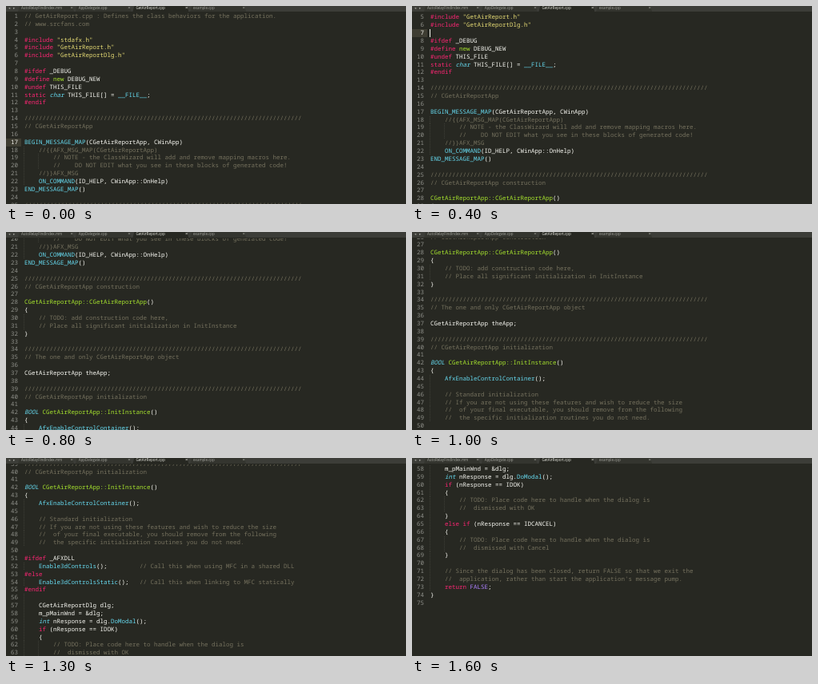
Recreate the animation shown at these times as an HTML page. Size 500x248 px, loop 2300 ms.

```html
<!DOCTYPE html>
<html lang="en">
<head>
<meta charset="utf-8">
<title>Scrolling code editor</title>
<style>
  html, body { margin: 0; width: 100%; height: 100%; overflow: hidden; background: #272822; }
  #stage { position: relative; width: 500px; height: 248px; overflow: hidden; background: #272822; }
  #bar { position: absolute; inset: 0 0 auto; height: 7px; overflow: hidden; background: #3c3d38;
    font: 4.5px/8px "Open Sans", sans-serif; color: #a3a49d; }
  #bar span { position: absolute; top: -2.5px; white-space: pre; }
  #bar .active { color: #e6e6de; }
  #bar .tab { top: 0; width: 70px; height: 7px; background: #34352f; clip-path: polygon(2px 0, 68px 0, 70px 100%, 0 100%); }
  #bar .tab.active { background: #272822; }
  #view { position: absolute; left: 0; top: 8px; width: 500px; height: 240px; overflow: hidden; }
  #code { position: absolute; left: 0; top: 0; width: 500px; color: #f8f8f2;
    font: 500 7.51px/9.86px "Noto Sans Mono", monospace; text-rendering: geometricPrecision; }
  .row { position: absolute; left: 0; width: 500px; height: 9.86px; white-space: pre; }
  .num { position: absolute; top: 1px; right: 485px; color: #8f908a; }
  .text { position: absolute; top: 1px; left: 22.9px; }
  .guide { position: absolute; top: 0; width: 1px; height: 9.86px;
    background: repeating-linear-gradient(#3d3e36 0 1px, transparent 1px 2px); }
  .mark { position: absolute; left: 0; width: 19px; height: 9.86px; background: #3e3d32; }
  #caret { position: absolute; left: 22px; width: 1px; height: 9.86px; background: #f8f8f0; }
  .comment { color: #75715e; }
  .string { color: #e6db74; }
  .word { color: #f92672; }
  .type { color: #66d9ef; font-style: italic; }
  .value { color: #ae81ff; }
  .name { color: #a6e22e; }
  .call { color: #66d9ef; }
</style>
</head>
<body>
<div id="stage">
  <div id="bar"></div>
  <div id="view"><div id="code"></div></div>
</div>
<script>
const LOOP = 2300, PITCH = 9.86, CHAR = 4.506;
const rule = '/'.repeat(77);

const lines = `// GetAirReport.cpp : Defines the class behaviors for the application.
// www.srcfans.com

#include "stdafx.h"
#include "GetAirReport.h"
#include "GetAirReportDlg.h"

#ifdef _DEBUG
#define new DEBUG_NEW
#undef THIS_FILE
static char THIS_FILE[] = __FILE__;
#endif

${rule}
// CGetAirReportApp

BEGIN_MESSAGE_MAP(CGetAirReportApp, CWinApp)
    //{{AFX_MSG_MAP(CGetAirReportApp)
        // NOTE - the ClassWizard will add and remove mapping macros here.
        //    DO NOT EDIT what you see in these blocks of generated code!
    //}}AFX_MSG
    ON_COMMAND(ID_HELP, CWinApp::OnHelp)
END_MESSAGE_MAP()

${rule}
// CGetAirReportApp construction

CGetAirReportApp::CGetAirReportApp()
{
    // TODO: add construction code here,
    // Place all significant initialization in InitInstance
}

${rule}
// The one and only CGetAirReportApp object

CGetAirReportApp theApp;

${rule}
// CGetAirReportApp initialization

BOOL CGetAirReportApp::InitInstance()
{
    AfxEnableControlContainer();

    // Standard initialization
    // If you are not using these features and wish to reduce the size
    //  of your final executable, you should remove from the following
    //  the specific initialization routines you do not need.

#ifdef _AFXDLL
    Enable3dControls();         // Call this when using MFC in a shared DLL
#else
    Enable3dControlsStatic();   // Call this when linking to MFC statically
#endif

    CGetAirReportDlg dlg;
    m_pMainWnd = &dlg;
    int nResponse = dlg.DoModal();
    if (nResponse == IDOK)
    {
        // TODO: Place code here to handle when the dialog is
        //  dismissed with OK
    }
    else if (nResponse == IDCANCEL)
    {
        // TODO: Place code here to handle when the dialog is
        //  dismissed with Cancel
    }

    // Since the dialog has been closed, return FALSE so that we exit the
    //  application, rather than start the application's message pump.
    return FALSE;
}
`.split('\n');

const syntax = new RegExp([
  '(?<comment>//.*)',
  '(?<string>"[^"]*")',
  '(?<word>#\\w+|\\b(?:static|if|else|return)\\b)',
  '(?<type>\\b(?:char|int|BOOL)\\b)',
  '(?<value>\\bFALSE\\b)',
  '(?<name>\\bnew\\b|CGetAirReportApp::\\w+)',
  '(?<call>__FILE__|\\w+(?=\\())'
].join('|'), 'g');

function add(parent, tag, cls, text = '', style = {}) {
  const el = document.createElement(tag);
  el.className = cls;
  el.textContent = text;
  Object.assign(el.style, style);
  parent.append(el);
  return el;
}

function highlight(parent, line) {
  let end = 0;
  for (const m of line.matchAll(syntax)) {
    const cls = Object.keys(m.groups).find(k => m.groups[k] !== undefined);
    parent.append(line.slice(end, m.index));
    add(parent, 'span', cls, m[0]);
    end = m.index + m[0].length;
  }
  parent.append(line.slice(end));
}

const bar = document.getElementById('bar');
const code = document.getElementById('code');
const rowTop = n => (n - 1) * PITCH + 'px';

// Tab strip
add(bar, 'span', '', '◂', { left: '3px' });
add(bar, 'span', '', '▸', { left: '9px' });
['AutoRelayFindIndex.mm', 'AppDelegate.cpp', 'GetAirReport.cpp', 'example.cpp'].forEach((title, i) => {
  const cls = i === 2 ? 'active' : '', x = 19 + i * 71.7;
  add(bar, 'span', 'tab ' + cls, '', { left: x - 4 + 'px' });
  add(bar, 'span', cls, title, { left: x + 'px' });
  add(bar, 'span', cls, '×', { left: x + 61.5 + 'px', fontSize: '6px' });
});

// Gutter marks and caret lie behind the text
const marks = [17, 7].map(n => add(code, 'div', 'mark', '', { top: rowTop(n) }));
const caret = add(code, 'div', '', '', { top: rowTop(7) });
caret.id = 'caret';

const numbers = lines.map((line, i) => {
  const row = add(code, 'div', 'row', '', { top: rowTop(i + 1) });
  const shape = line || lines[i + 1] || '';
  const depth = shape.match(/^ */)[0].length / 4;
  for (let d = 0; d < depth; d++) add(row, 'i', 'guide', '', { left: 22 + d * 4 * CHAR + 'px' });
  const num = add(row, 'span', 'num', i + 1);
  highlight(add(row, 'span', 'text'), line);
  return num;
});

// Each step is [time, value], held until the next one
function play(el, prop, steps) {
  const keys = steps.map(([t, v]) => ({ offset: t / LOOP, [prop]: v, easing: 'step-end' }));
  keys.push({ offset: 1, [prop]: steps[steps.length - 1][1] });
  el.animate(keys, { duration: LOOP, iterations: Infinity });
}

const scroll = [38, 75, 111, 151, 191, 224, 253, 283, 316, 380, 443, 503, 561];
play(code, 'transform', [[0, 'translateY(0px)'],
  ...scroll.map((y, i) => [400 + i * 100, `translateY(${-y}px)`])]);

const on = '#f8f8f2', off = '#8f908a';
play(numbers[16], 'color', [[0, on], [200, off]]);
play(numbers[6], 'color', [[0, off], [200, on]]);
play(marks[0], 'opacity', [[0, 1], [200, 0]]);
play(marks[1], 'opacity', [[0, 0], [200, 1]]);
play(caret, 'opacity', [[0, 0], [200, 1]]);
</script>
</body>
</html>
```
